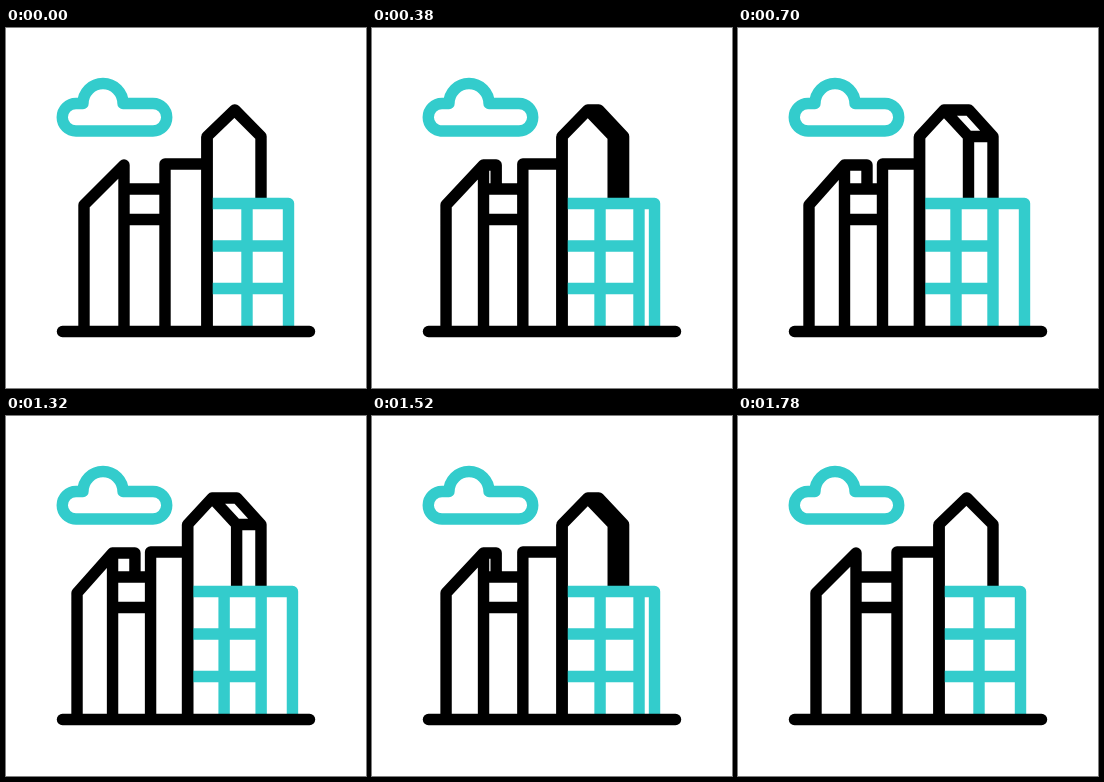
Write an HTML page that moves like this. It is 360 by 360 pixels and loops after 1.94 s.

```html
<!DOCTYPE html>
<html lang="en">
<head>
<meta charset="utf-8">
<title>City skyline</title>
<style>
  html, body { margin: 0; width: 100%; height: 100%; overflow: hidden; background: #fff; }
  svg { display: block; width: 100%; height: 100%; }
  path { fill: none; stroke: #000; stroke-width: 11.4; stroke-linejoin: round; }
  .teal { stroke: #33cccc; }
</style>
</head>
<body>
<svg viewBox="0 0 360 360">
  <path class="teal" d="M70 103H147A13.75 13.75 0 0 0 147 75.5H117A20 20 0 0 0 77 75.5H70A13.75 13.75 0 0 0 70 103Z"/>
  <path id="tower"/>
  <path id="offices" class="teal"/>
  <path id="blocks"/>
  <path d="M56.5 303.5H303.5" stroke-linecap="round"/>
</svg>
<script>
const LOOP = 1940, STEP = 20, GROUND = 303;
const OPEN_TIME = 700, CLOSE_START = 1300, CLOSE_TIME = 480;

const mix = (a, b, p) => a + (b - a) * p;
const ease = u => u * u * (3 - 2 * u);
const clamp = u => Math.min(1, Math.max(0, u));
const setPath = (id, d) => document.getElementById(id).setAttribute('d', d);

// p = 0: buildings seen head-on, p = 1: turned to show their sides
function draw(p) {
  const towerLeft = mix(201, 181.5, p);
  const towerPeak = mix(228.5, 206, p);
  const towerFront = mix(255, 230.5, p);
  const towerSide = Math.max(towerFront, mix(247.2, 255, p));
  const backPeak = Math.max(towerPeak, towerSide - mix(26, 24, p));
  setPath('tower',
    `M${towerLeft} ${GROUND}V108.5L${towerPeak} 82L${towerFront} 108.5V174` +
    `M${towerPeak} 82H${backPeak}L${towerSide} 108.5V174` +
    `M${towerFront} 108.5H${towerSide}`);

  const mullion = mix(241, 218, p);
  const officeFront = mix(282.5, 255, p);
  const officeSide = Math.max(officeFront, mix(277.4, 286.5, p));
  setPath('offices',
    `M${towerLeft} 175.5H${officeSide}V${GROUND}` +
    `M${officeFront} 175.5V${GROUND}M${mullion} 175.5V${GROUND}` +
    `M${towerLeft} 218H${officeFront}M${towerLeft} 260.5H${officeFront}`);

  const slantLeft = mix(78, 71, p);
  const slantFront = mix(118, 106.5, p);
  const slantSide = mix(118, 129, p);
  const midLeft = mix(159, 144.5, p);
  setPath('blocks',
    `M${slantLeft} ${GROUND}V177L${slantFront} 137V${GROUND}` +
    `M${slantFront} 137H${slantSide}V160` +
    `M${slantFront} 161H${midLeft}M${slantFront} 191.5H${midLeft}` +
    `M${midLeft} ${GROUND}V136H${towerLeft}` +
    `M${towerLeft} 108.5V${GROUND}`);
}

function frame() {
  const t = Math.floor(performance.now() % LOOP / STEP) * STEP;
  const turned = t < CLOSE_START
    ? clamp(t / OPEN_TIME)
    : 1 - clamp((t - CLOSE_START) / CLOSE_TIME);
  draw(ease(turned));
  requestAnimationFrame(frame);
}
frame();
</script>
</body>
</html>
```
